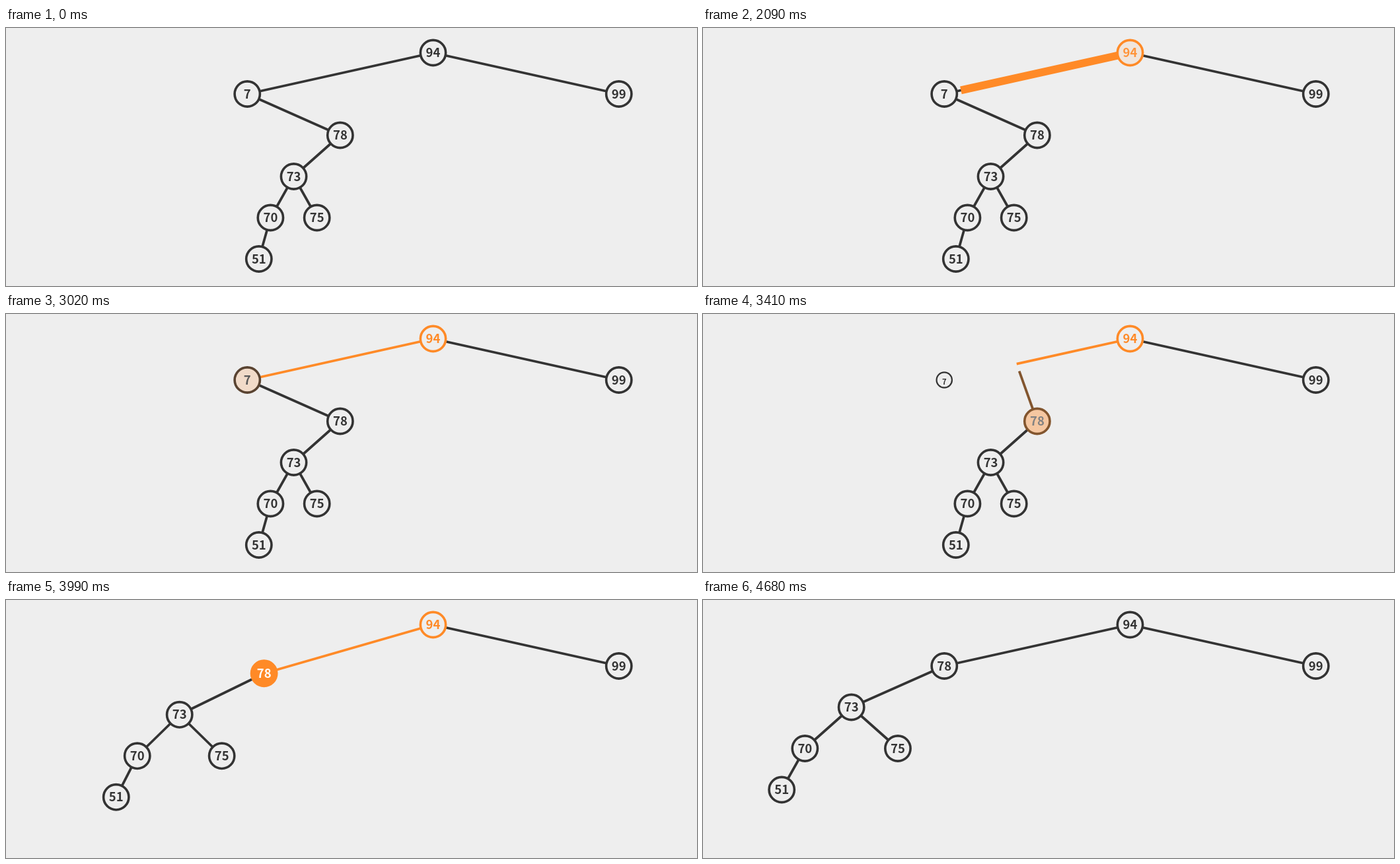
An HTML page with a canvas for the animation above (5.17 s loop, 1046 by 391 pixels).

```html
<!DOCTYPE html>
<html lang="en">
<head>
<meta charset="utf-8">
<title>Removing a node from a binary search tree</title>
<style>
  html, body { margin: 0; width: 100%; height: 100%; overflow: hidden; background: #eee; }
  canvas { display: block; }
</style>
</head>
<body>
<canvas id="stage" width="1046" height="391"></canvas>
<script>
const ctx = document.getElementById("stage").getContext("2d");

const LOOP = 5170;
// The picture is held between these moments.
const TICKS = [0, 1430, 1550, 1700, 1820, 1970, 2090, 2210, 2360, 2480, 2600, 2870, 3020,
  3170, 3290, 3410, 3570, 3710, 3830, 3990, 4140, 4290, 4410, 4530, 4680];

const PAPER = [238, 238, 238], INK = [51, 51, 51], ORANGE = [255, 138, 39], WHITE = [255, 255, 255];
const RADIUS = 19.15, RING = 3.6, EDGE = 3.75, SWEEP = 12, FONT_SIZE = 18.5;

const mix = (a, b, p) => a + (b - a) * p;
const mixColor = (a, b, p) => a.map((v, i) => mix(v, b[i], p));
const mixPoint = (a, b, p) => ({ x: mix(a.x, b.x, p), y: mix(a.y, b.y, p) });
const css = c => `rgb(${c.map(Math.round).join()})`;

// Cubic ease in and out
function ease(time, start, duration = 500) {
  const t = Math.min(1, Math.max(0, (time - start) / duration));
  return t < 0.5 ? 4 * t ** 3 : 1 - 4 * (1 - t) ** 3;
}

// Position of a node from its path of left and right turns
function place(path) {
  let x = 646.5, step = 281.25;
  for (const turn of path) {
    x += turn === "L" ? -step : step;
    step /= 2;
  }
  return { x, y: 37.5 + 62.5 * path.length };
}

// value: [parent, path before, path after]
const TREE = {
  94: [null, "", ""],
  7: [94, "L", "L"],
  99: [94, "R", "R"],
  78: [7, "LR", "L"],
  73: [78, "LRL", "LL"],
  70: [73, "LRLL", "LLL"],
  75: [73, "LRLR", "LLR"],
  51: [70, "LRLLL", "LLLL"],
};

function line(a, b, color, width = EDGE) {
  ctx.strokeStyle = css(color);
  ctx.lineWidth = width;
  ctx.beginPath();
  ctx.moveTo(a.x, a.y);
  ctx.lineTo(b.x, b.y);
  ctx.stroke();
}

function node(value, { x, y }, { ring = INK, fill = PAPER, text = INK }, scale = 1) {
  ctx.beginPath();
  ctx.arc(x, y, RADIUS * scale, 0, 2 * Math.PI);
  ctx.fillStyle = css(fill);
  ctx.fill();
  ctx.strokeStyle = css(ring);
  ctx.lineWidth = RING * scale;
  ctx.stroke();
  ctx.fillStyle = css(text);
  ctx.font = `bold ${FONT_SIZE * scale}px "Noto Sans CJK JP", "Noto Sans CJK SC", "Noto Sans CJK", "Noto Sans", sans-serif`;
  ctx.fillText(value, x, y + 6.5);
}

const highlight = p => ({
  ring: mixColor(INK, ORANGE, p),
  fill: mixColor(PAPER, ORANGE, p),
  text: mixColor(INK, WHITE, p),
});

function draw(time) {
  const visitRoot = ease(time, 1231);
  const descend = ease(time, 1626, 646);
  const found = ease(time, 2200) - ease(time, 2700);
  const remove = ease(time, 3180);
  const relayout = ease(time, 3668);
  const reset = ease(time, 4180);
  const removed = remove === 1;

  const at = {};
  for (const value in TREE) {
    const [, before, after] = TREE[value];
    at[value] = mixPoint(place(before), place(after), relayout);
  }

  ctx.fillStyle = css(PAPER);
  ctx.fillRect(0, 0, 1046, 391);
  ctx.textAlign = "center";

  for (const value of [99, 73, 70, 75, 51]) line(at[TREE[value][0]], at[value], INK);

  // The freed edge ends slide from the removed node up to the root.
  const joint = mixPoint(at[7], at[94], remove);
  if (!removed) {
    const arrived = descend > 0.99;
    line(at[94], joint, arrived ? ORANGE : INK);
    if (descend > 0 && !arrived) line(at[94], mixPoint(at[94], at[7], descend), ORANGE, SWEEP);
  }
  const anchor = removed ? at[94] : joint;
  const gap = RADIUS * (1 - remove) / Math.hypot(anchor.x - at[78].x, anchor.y - at[78].y);
  line(at[78], mixPoint(anchor, at[78], gap), mixColor(INK, ORANGE, remove - reset));

  for (const value of [99, 73, 70, 75, 51]) node(value, at[value], {});
  if (!removed) node(7, at[7], highlight(found), 1 - remove);
  node(78, at[78], highlight(remove - reset));

  const root = highlight(visitRoot);
  node(94, at[94], {
    ring: mixColor(root.ring, INK, reset),
    fill: mixColor(root.fill, PAPER, descend),
    text: mixColor(mixColor(root.text, ORANGE, descend), INK, reset),
  });
}

function frame() {
  const now = performance.now() % LOOP;
  draw(TICKS.findLast(tick => tick <= now));
  requestAnimationFrame(frame);
}
frame();
</script>
</body>
</html>
```
